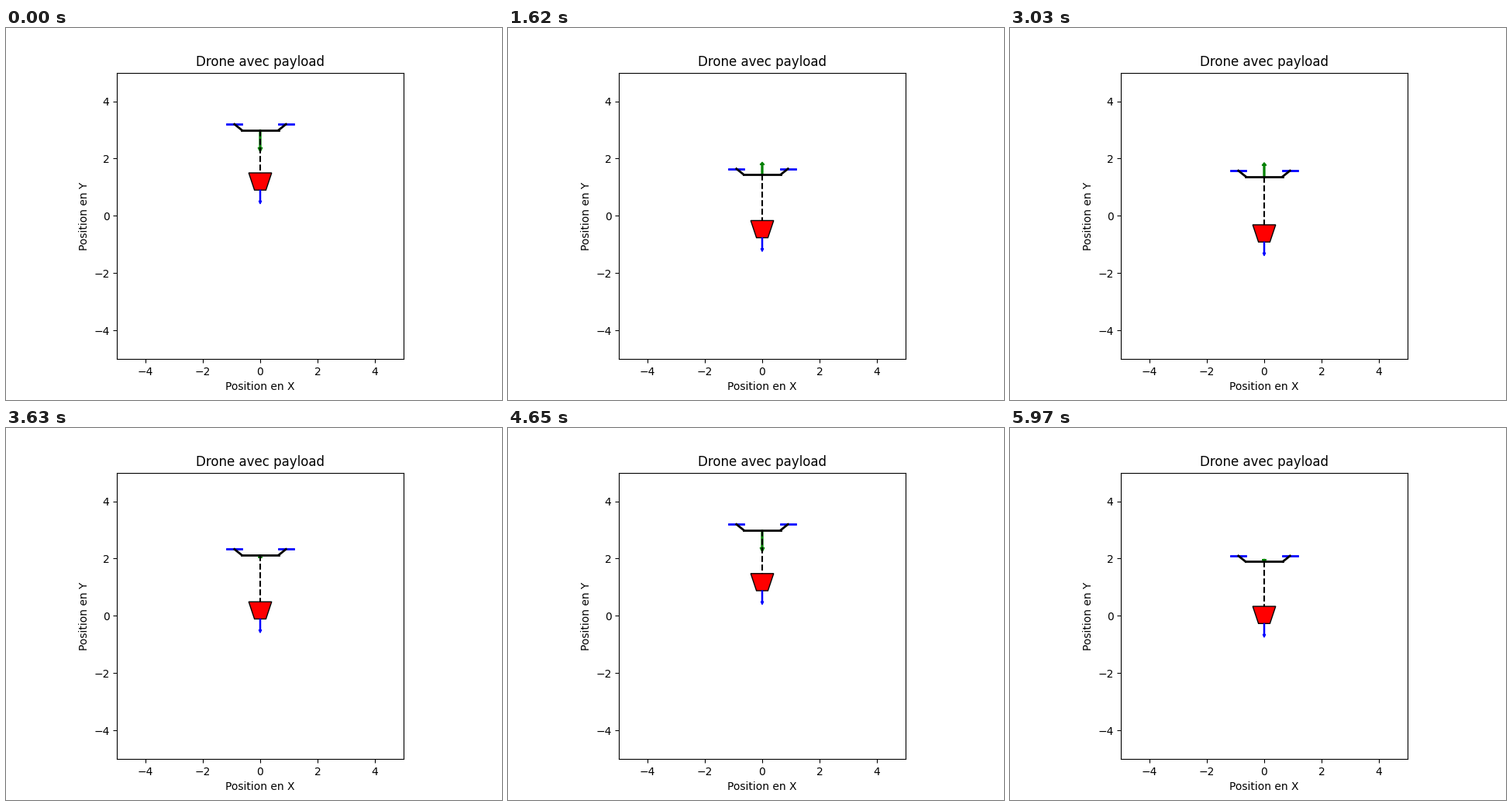
Animation, 640 px wide and 480 px high, one loop 6000 ms. Source, as a matplotlib script:

```python
import numpy as np
import matplotlib.pyplot as plt
from matplotlib.animation import FuncAnimation
from matplotlib.patches import FancyArrow, Polygon

FRAMES = 200
INTERVAL = 30
DT = 0.04
SUBSTEPS = 20

# Elastic rope (per unit of payload mass)
ROPE = 1.5
STIFFNESS = 10.0
DAMPING = 5.0
GRAVITY = 1.0

THRUST_SCALE = 0.77
HEAD_RATIO = 0.15
WEIGHT = 0.48

PAYLOAD = np.array([(-0.4, 0), (0.4, 0), (0.2, -0.6), (-0.2, -0.6)])


def drone_height(t):
    return 2 + np.cos(t)


def rope_lengths():
    """Rope length at each frame, with the payload hanging as a damped spring."""
    stretch, speed = 0.0, 0.0
    h = DT / SUBSTEPS
    lengths = []
    for i in range(FRAMES):
        lengths.append(ROPE + stretch)
        for j in range(SUBSTEPS):
            t = i * DT + j * h
            force = GRAVITY - np.cos(t) - STIFFNESS * stretch - DAMPING * speed
            speed += force * h
            stretch += speed * h
    return lengths


lengths = rope_lengths()

fig, ax = plt.subplots(figsize=(6.4, 4.8), dpi=100)
ax.set_xlim(-5, 5)
ax.set_ylim(-5, 5)
ax.set_aspect("equal")
ax.set_title("Drone avec payload")
ax.set_xlabel("Position en X")
ax.set_ylabel("Position en Y")


def add_part(xs, dys, color):
    line, = ax.plot(xs, dys, color=color, lw=2)
    return line, np.array(dys)


parts = [add_part([s * 0.65, s * 1.15], [0.2, 0.2], "blue") for s in (-1, 1)]
parts.append(add_part([-0.65, 0.65], [0, 0], "black"))
parts += [add_part([s * 0.65, s * 0.9], [0, 0.2], "black") for s in (-1, 1)]
rope, = ax.plot([0, 0], [0, 0], "k--", lw=1.5)

payload = ax.add_patch(Polygon(PAYLOAD, fc="red", ec="black", lw=1))
thrust = ax.add_patch(FancyArrow(0, 0, 0, 1, width=0.05, head_width=0.15,
                                 length_includes_head=True, color="green"))
weight = ax.add_patch(FancyArrow(0, 0, 0, -WEIGHT, width=0.03, head_width=0.09,
                                 head_length=0.1, length_includes_head=True,
                                 color="blue"))


def update(i):
    t = i * DT
    y = drone_height(t)
    top = y - lengths[i]
    accel = -np.cos(t)

    for line, dys in parts:
        line.set_ydata(y + dys)
    rope.set_ydata([y, top])
    payload.set_xy(PAYLOAD + (0, top))
    thrust.set_data(x=0, y=y, dx=0, dy=THRUST_SCALE * accel,
                    head_length=HEAD_RATIO * abs(accel))
    weight.set_data(x=0, y=top - 0.6, dx=0, dy=-WEIGHT)
    return [line for line, _ in parts] + [rope, payload, thrust, weight]


anim = FuncAnimation(fig, update, frames=FRAMES, interval=INTERVAL,
                     repeat=True, repeat_delay=0)
plt.show()
```
